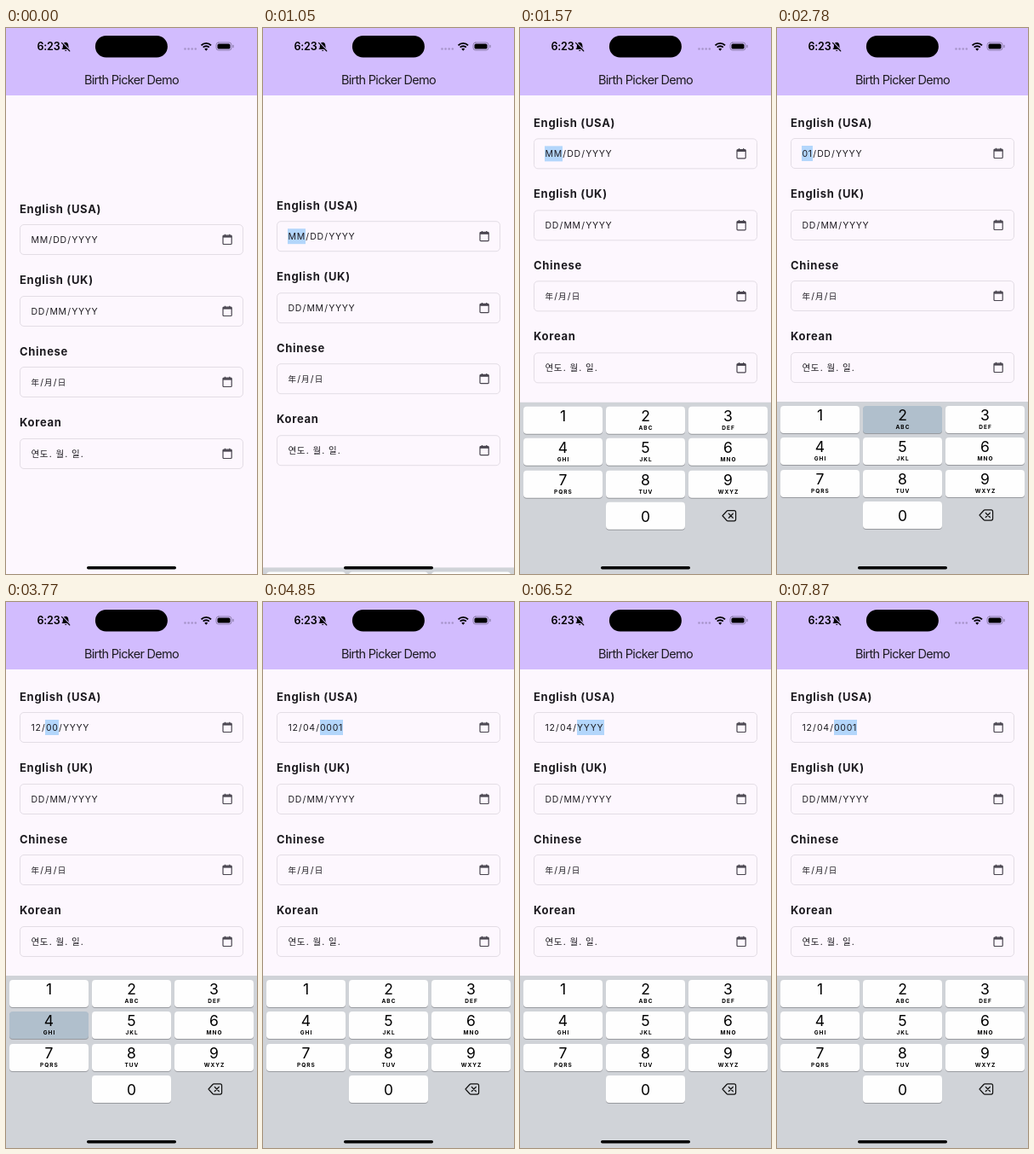
An HTML page for the animation above (8000 ms loop, 295 by 640 pixels).

```html
<!DOCTYPE html>
<html lang="en">
<head>
<meta charset="utf-8">
<title>Birth Picker Demo</title>
<style>
  html, body { margin: 0; width: 100%; height: 100%; overflow: hidden; }
  body { position: relative; background: #fdf7fe; color: #1d1b20;
    font-family: Inter, "Noto Sans CJK SC", "Noto Sans CJK KR", "Noto Sans CJK", sans-serif; }
  svg, #form, #keyboard, header, .label, .field, .key { position: absolute; }
  svg { left: 0; top: 0; overflow: visible; }
  header { left: 0; top: 0; width: 295px; height: 79px; background: #d2bcfe; }
  header div { position: absolute; white-space: nowrap; line-height: 20px; }
  #clock { left: 36.5px; top: 11.5px; font-size: 12.5px; font-weight: 600; letter-spacing: -.2px; color: #000; }
  #title { left: 0; width: 295px; top: 51px; text-align: center; font-size: 14.5px; letter-spacing: -.7px; }
  #form { left: 0; top: 0; }
  .label { left: 16px; line-height: 18px; font-size: 13px; font-weight: 700; letter-spacing: .7px; white-space: nowrap; }
  .field { left: 16px; width: 263px; height: 36px; box-sizing: border-box; border: 1px solid #e3dde5;
    border-radius: 5px; padding-left: 12px; display: flex; align-items: center;
    font-size: 10.5px; line-height: 19px; letter-spacing: .65px; white-space: pre; }
  .field span { height: 18px; }
  .part { padding: 0 .5px; }
  .zh .part { font-size: 9.5px; }
  .selected { background: #b3d6fb; }
  #keyboard { left: 0; top: 438px; width: 295px; height: 202px; background: #d0d3d8; color: #000; }
  .key { width: 93px; height: 32px; border-radius: 4px; background: #fefefe; box-shadow: 0 1px 0 #989a9f;
    text-align: center; }
  .key.pressed { background: #b0bfcc; }
  .key b, .key small { position: absolute; left: 0; width: 100%; }
  .key b { top: 1px; font-size: 17.5px; line-height: 20px; font-weight: 400; }
  .key small { top: 21px; font-size: 6.5px; line-height: 9px; font-weight: 700; letter-spacing: 1px; text-indent: 1px; }
</style>
</head>
<body>
<div id="form"></div>
<header>
  <div id="clock">6:23</div>
  <div id="title">Birth Picker Demo</div>
  <svg width="295" height="79" fill="none" stroke-linecap="round">
    <rect x="104.900" y="9" width="85" height="25.400" rx="12.700" fill="#000"/>
    <path d="M65.300 25c1.500-1 1.500-2.500 1.600-4 .1-5.600 6.400-5.600 6.500 0 .1 1.500.1 3 1.600 4zM68.800 26h2.800q-1.400 2.200-2.800 0" fill="#000"/>
    <path d="M66.400 16.900l9 9.400" stroke="#d2bcfe" stroke-width="1.300"/>
    <path d="M65.500 17.300l9.300 9.700" stroke="#000" stroke-width="1.100"/>
    <path d="M210.500 24.500h13" stroke="#a693c9" stroke-width="2.600" stroke-dasharray="0 4.100"/>
    <path d="M229.500 20.300a8 8 0 0 1 11.500 0M231.700 22.700a5 5 0 0 1 7.100 0" stroke="#000" stroke-width="1.900" stroke-linecap="butt"/>
    <path d="M235.250 26.700l-2-2.100a2.900 2.900 0 0 1 4 0z" fill="#000"/>
    <rect x="247" y="17" width="18" height="9" rx="2.800" stroke="#8f80ad"/>
    <rect x="248.500" y="18.500" width="15" height="6" rx="1.600" fill="#000"/>
    <path d="M267 20.500v2" stroke="#8f80ad" stroke-width="1.300"/>
  </svg>
</header>
<div id="keyboard"></div>
<svg width="295" height="640"><rect x="95" y="631" width="105" height="3.500" rx="1.750"/></svg>
<script>
const LOOP = 8000, FOCUS = 1030, KEYBOARD_HEIGHT = 202, PRESS_TIME = 110;
const form = document.getElementById('form'), keyboard = document.getElementById('keyboard');

const calendar = `<svg width="12" height="14" style="left:236.500px;top:10px" fill="none" stroke="#49454f">
  <rect x="1" y="2.200" width="10.200" height="10.300" rx="1" stroke-width="1.200"/>
  <path d="M1 3.500h10.200" stroke-width="2.200"/><path d="M3.500 .7v2M8.700 .7v2" stroke-width="1.200"/></svg>`;

// Each field alternates editable parts with separators.
const fields = [
  ['English (USA)', 'en', ['MM', '/', 'DD', '/', 'YYYY']],
  ['English (UK)', 'en', ['DD', '/', 'MM', '/', 'YYYY']],
  ['Chinese', 'zh', ['年', '/', '月', '/', '日']],
  ['Korean', 'ko', ['연도', '. ', '월', '. ', '일', '.']],
];
form.innerHTML = fields.map(([label, lang, parts], i) => {
  const y = 248 + i * 83.6;
  const spans = parts.map((p, j) => `<span class="${j % 2 ? '' : 'part'}">${p}</span>`).join('');
  return `<div class="label" style="top:${y - 45.5}px">${label}</div>
    <div class="field ${lang}" lang="${lang}" style="top:${y - 18}px">${spans}${calendar}</div>`;
}).join('');
const dateParts = [...form.querySelector('.field').querySelectorAll('.part')];

const letters = ['', 'ABC', 'DEF', 'GHI', 'JKL', 'MNO', 'PQRS', 'TUV', 'WXYZ'];
const keyHtml = (digit, col, row, sub) =>
  `<div class="key" data-key="${digit}" style="left:${4 + col * 97}px;top:${5 + row * 37.4}px">
    <b style="${digit ? '' : 'top:6.500px'}">${digit}</b><small>${sub}</small></div>`;
keyboard.innerHTML =
  letters.map((sub, i) => keyHtml(i + 1, i % 3, Math.floor(i / 3), sub)).join('') + keyHtml(0, 1, 3, '') +
  `<svg width="295" height="202" fill="none" stroke="#111" stroke-width="1.200" stroke-linejoin="round" stroke-linecap="round">
    <path id="erase" d="M238 133l5-5.500q.6-.6 1.400-.6h7.200q2 0 2 2v8.200q0 2-2 2h-7.200q-.8 0-1.400-.6z"/>
    <path id="cross" d="M245.300 130.500l5 5m0-5l-5 5"/></svg>`;
const keys = [...keyboard.querySelectorAll('.key')];
const erase = document.getElementById('erase'), cross = document.getElementById('cross');

// Key presses: time, key, resulting date, selected part.
const presses = [
  [2000, '1', '01/DD/YYYY', 0],
  [2780, '2', '12/DD/YYYY', 1],
  [3330, '0', '12/00/YYYY', 1],
  [3770, '4', '12/04/YYYY', 2],
  [4290, '1', '12/04/0001', 2],
  [4950, '9', '12/04/0019', 2],
  [5410, '9', '12/04/0199', 2],
  [5860, '8', '12/04/1998', 2],
  [6300, 'erase', '12/04/YYYY', 2],
  [6850, 'erase', '12/04/YYYY', 2],
  [7640, '1', '12/04/0001', 2],
];

// Critically damped spring from 0 to 1.
function spring(ms) {
  const x = Math.max(0, ms) * 0.0144;
  return 1 - (1 + x) * Math.exp(-x);
}

function render(t) {
  const rise = KEYBOARD_HEIGHT * spring(t - FOCUS);
  form.style.transform = `translateY(${-rise / 2}px)`;
  keyboard.style.transform = `translateY(${KEYBOARD_HEIGHT - rise}px)`;

  let date = 'MM/DD/YYYY', selected = t < FOCUS ? -1 : 0, down = null;
  for (const [time, key, result, part] of presses) {
    if (t >= time + PRESS_TIME) [date, selected] = [result, part];
    else if (t >= time) down = key;
  }
  date.split('/').forEach((text, i) => {
    dateParts[i].textContent = text;
    dateParts[i].classList.toggle('selected', i === selected);
  });
  for (const key of keys) key.classList.toggle('pressed', key.dataset.key === down);
  erase.setAttribute('fill', down === 'erase' ? '#111' : 'none');
  cross.setAttribute('stroke', down === 'erase' ? '#d0d3d8' : '#111');
}

const start = performance.now();
function tick() {
  render((performance.now() - start) % LOOP);
  requestAnimationFrame(tick);
}
tick();
</script>
</body>
</html>
```
